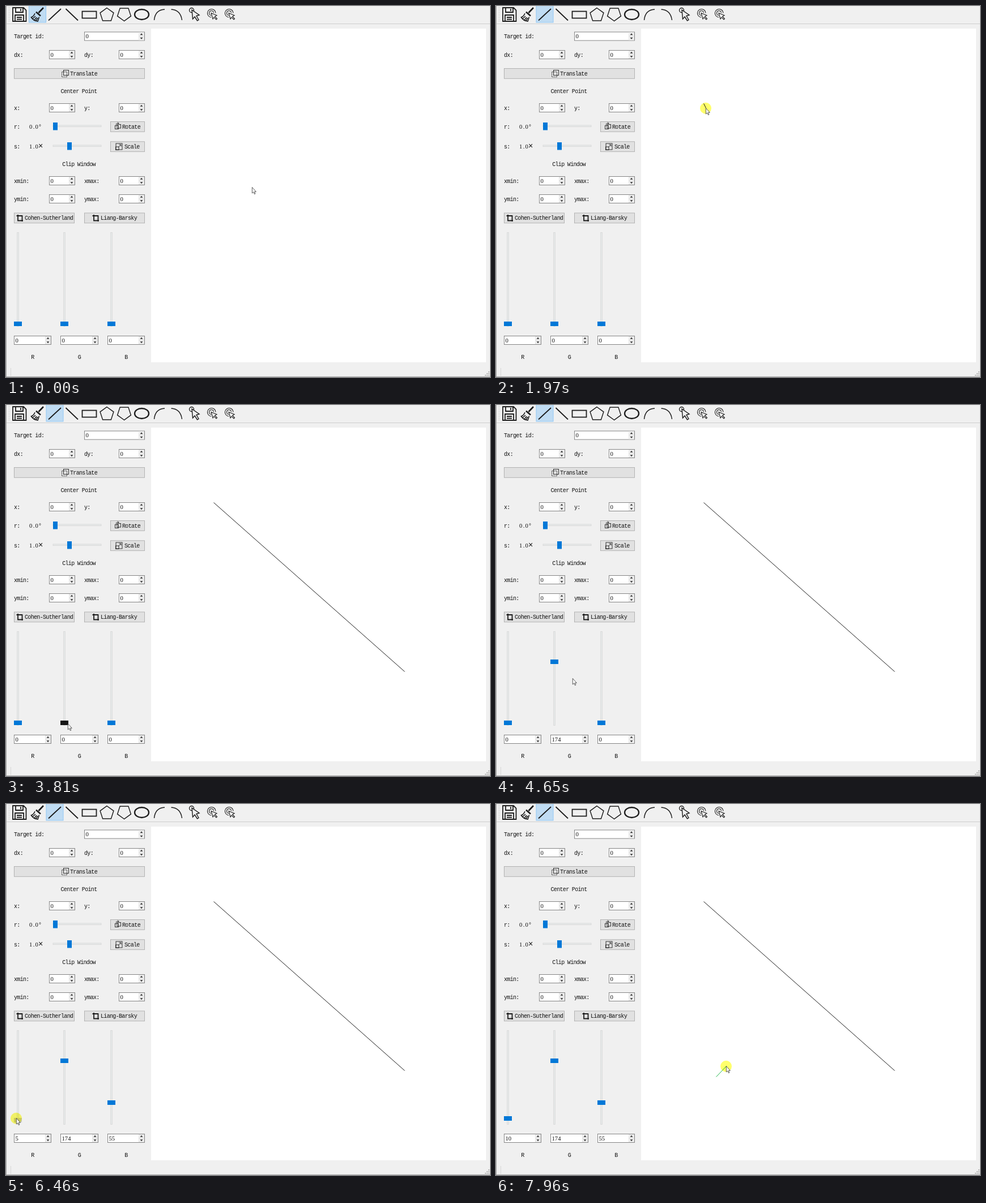
These frames come from a looping animation (854 px wide and 656 px high, 8 s). An HTML page:

```html
<!DOCTYPE html>
<html lang="en">
<head>
<meta charset="utf-8">
<title>Drawing board</title>
<style>
html, body { margin: 0; width: 100%; height: 100%; overflow: hidden; background: #f0f0f0; }
svg { display: block; width: 854px; height: 656px; }
text { font: 10px "Liberation Mono", "DejaVu Sans Mono", monospace; letter-spacing: -.67px; fill: #111; white-space: pre; }
.number { font: 10.67px "Liberation Serif", "Noto Serif", serif; letter-spacing: 0; }
.ink { fill: none; stroke: #1c1c1c; stroke-width: 1.8; }
.thin { fill: none; stroke: #222; stroke-width: .9; }
.field { fill: #fff; stroke: #7a7a7a; stroke-width: .9; }
.spin { fill: #f0f0f0; stroke: #dadada; stroke-width: .6; }
.button { fill: #e1e1e1; stroke: #adadad; stroke-width: .9; }
.groove { fill: #e7eaea; stroke: #d6d6d6; stroke-width: .8; }
</style>
</head>
<body>
<svg viewBox="0 0 854 656">
  <rect width="854" height="656" fill="#f0f0f0"/>
  <path d="M.5 0V656M0 655.5H854" stroke="#a6a6a6"/>
  <path d="M1 31.5H854" stroke="#cfcfcf"/>
  <path d="M5.5 2V29" stroke="#c4c4c4" stroke-width="1.5" stroke-dasharray="1 2"/>
  <path d="M8.5 640V654" stroke="#d7d7d7"/>
  <path d="M851 647h2M848 650h5M845 653h8" stroke="#b4b4b4" stroke-width="2" stroke-dasharray="2 1"/>
  <rect x="256" y="40" width="591" height="590" fill="#fff"/>
  <rect id="checked" y="-.5" width="30" height="29.5" fill="#c0dcf3" stroke="#90c8f6"/>
  <g id="toolbar" class="ink">
    <path d="M12 3H31L35.500 7.500V27H12ZM17 3V11H30V3M26 5V9M16 27V16H31V27M19 20H28M19 23.500H28"/>
    <path d="M66 3L57.500 12" stroke-width="2.600"/>
    <path d="M53 10.500L61 17.500" stroke-width="2.600"/>
    <path d="M51 13Q49 18.500 44.500 20Q48 26 56 27L58.500 19.500M47 22.500L52 18M50 25L54 20M53 26L56 21" stroke-width="1.600"/>
    <path d="M75 25.500L97 5M105.500 5L127 25.500"/>
    <rect x="134.500" y="9.500" width="25" height="12"/>
    <ellipse cx="239.500" cy="15" rx="12.500" ry="9" stroke-width="2.300"/>
    <path d="M261.500 25Q263 7 280 6M291.500 6Q308 7 310.500 25" stroke-width="1.400"/>
    <circle cx="327.500" cy="7.500" r="4" stroke-width="1.300"/>
    <path d="M328 7L329.500 23L333 19L337.500 26L340 24.500L336 17.500L341 16Z" fill="#f0f0f0" stroke-width="1.400"/>
  </g>
  <g id="panel"></g>
  <path id="first" stroke="#000" stroke-width=".9"/>
  <path id="second" stroke="#0aae37" stroke-width=".9"/>
  <circle id="glow" r="10" fill="#ffff6c" style="mix-blend-mode:multiply"/>
  <path id="arrow" d="M.300 .500V11L2.700 8.900L4.400 12.700L5.900 12L4.300 8.400H7.300Z" fill="#fff" stroke="#333" stroke-width=".8"/>
</svg>
<script>
const $ = id => document.getElementById(id);

function add(tag, attrs, parent = $('panel')) {
  const el = document.createElementNS('http://www.w3.org/2000/svg', tag);
  for (const key in attrs) el.setAttribute(key, attrs[key]);
  parent.append(el);
  return el;
}
const rect = (cls, x, y, width, height) => add('rect', { class: cls, x, y, width, height });

// y is the middle of the line of text
function label(s, x, y, attrs = {}) {
  const el = add('text', { x, y: y + 3.2, ...attrs });
  el.textContent = s;
  return el;
}
const centred = (s, x, y) => label(s, x, y, { 'text-anchor': 'middle' });

function spinBox(x, y, w) {
  const right = x + w;
  rect('field', x + .5, y - 7.5, w - 1, 15);
  for (const side of [-1, 1]) {
    rect('spin', right - 10.5, y - 3.25 + side * 3.5, 9, 6.5);
    add('path', { d: `M${right - 8.5} ${y + side * 2.2}h5l-2.5 ${side * 3}z`, fill: '#333' });
  }
  return label('0', x + 2.5, y + .7, { class: 'number' });
}

function button(s, x, y, w, textX) {
  rect('button', x + .5, y, w - 1, 17.8);
  label(s, textX, y + 9);
}

// Square of the given size at the middle of an icon
const square = (x, y, size, dash = '') =>
  add('rect', { class: 'thin', x, y, width: size, height: size, 'stroke-dasharray': dash });

function cropIcon(x, y) {
  add('path', { class: 'ink', 'stroke-width': 1.5, d: `M${x + 2.5} ${y}v10.5h9M${x} ${y + 2}h10v10` });
}

function pentagon(cx, cy, r, turn) {
  const points = [0, 1, 2, 3, 4].map(i => {
    const a = turn + i * Math.PI * .4;
    return [cx + r * Math.sin(a), cy - r * Math.cos(a)];
  });
  add('polygon', { points, style: 'stroke-width:1.5' }, $('toolbar'));
}
pentagon(178, 16, 12.5, 0);
pentagon(208.5, 14, 12.5, Math.PI);

for (const x of [355, 386]) add('path', {
  transform: `translate(${x} 0)`, style: 'stroke-width:1.1',
  d: 'M7 20A7.300 7.300 0 1 1 15 12.500M7 16.500A4 4 0 1 1 11.500 12M7 12.500L10 23L12 20L16 24L17.500 22.500L13.500 18.500L17 16.500Z'
}, $('toolbar'));

label('Target id:', 14, 54);
spinBox(138, 53.5, 107);
for (const [left, right, y] of [['dx:', 'dy:', 86], ['x:', 'y:', 180], ['xmin:', 'xmax:', 309], ['ymin:', 'ymax:', 341]]) {
  label(left, 14, y + .3);
  spinBox(76, y, 46);
  label(right, 138, y + .3);
  spinBox(199, y, 46);
}
centred('Center Point', 128.5, 150.5);
centred('Clip Window', 128.5, 280);

button('Translate', 14, 110.5, 231, 113);
button('Rotate', 184, 204.5, 61, 205);
button('Scale', 184, 239.8, 61, 209);
button('Cohen-Sutherland', 14, 366, 107, 33);
button('Liang-Barsky', 138, 366, 107, 167);
square(101.5, 113.5, 9);
square(98.5, 116.5, 9, '2 1');
square(192.5, 211.5, 6);
square(196, 209.5, 6.5);
add('path', { class: 'thin', d: 'M194 210Q194 207 199 207.500M197 205.500L199 207.500L197 209.500' });
square(193.5, 249, 5.5);
square(194, 243, 11);
add('path', { class: 'thin', d: 'M198 250L203 245M199.500 245H203V248.500' });
cropIcon(18.5, 369);
cropIcon(152.5, 369);

function dial(name, value, unit, y, knobX) {
  label(name, 14, y + .5);
  label(value, 41, y + .5, { class: 'number', style: 'letter-spacing:1.3px' });
  label(unit, 57, y + .5, { style: unit === '×' ? 'font-size:14px' : '' });
  rect('groove', 83, y - 2, 85, 2.6);
  add('rect', { x: knobX, y: y - 7, width: 8, height: 13.5, fill: '#0078d7' });
}
dial('r:', '0.0', '°', 213, 83);
dial('s:', '1.0', '×', 248, 108);

// Each slider follows the pointer while it is dragged
const sliders = [
  { name: 'R', x: 14, w: 66, from: 6330, to: 6620 },
  { name: 'G', x: 96, w: 67, from: 4240, to: 4470 },
  { name: 'B', x: 179, w: 66, from: 5150, to: 5480 }
];
for (const s of sliders) {
  rect('groove', s.x + 5.7, 400.5, 2.6, 166);
  s.knob = add('rect', { x: s.x, width: 14, height: 8 });
  s.text = spinBox(s.x, 591, s.w);
  centred(s.name, s.x + s.w / 2, 621);
}

// Pointer stops: time, x, y, and 1 where the button goes or stays down
const stops = [
  [320, 434, 320], [1120, 85, 14, 1], [1340, 85, 14], [1680, 475, 145],
  [1900, 366, 172, 1], [1970, 370, 180, 1], [2450, 703, 471], [2800, 492, 503],
  [2900, 264, 538], [3310, 119, 565], [4000, 107, 562, 1], [4240, 107, 562, 1],
  [4470, 107, 454], [4650, 135, 483], [5020, 195, 564], [5150, 187, 561, 1],
  [5480, 187, 527], [5720, 187, 527], [6140, 18, 558], [6330, 18, 558, 1],
  [6620, 18, 552], [6750, 18, 552], [7180, 211, 490], [7480, 330, 414],
  [7790, 388, 482, 1], [7960, 406, 463, 1]
];

function pointer(t) {
  const i = stops.findIndex(stop => stop[0] > t);
  const [t1, x1, y1, held] = stops.at(i < 0 ? -1 : Math.max(i - 1, 0));
  if (i <= 0) return { x: x1, y: y1, down: !!held };
  const [t2, x2, y2] = stops[i];
  const p = (t - t1) / (t2 - t1), ease = p * p * (3 - 2 * p);
  return { x: Math.round(x1 + (x2 - x1) * ease), y: Math.round(y1 + (y2 - y1) * ease), down: !!held };
}

const clamp = (v, lo, hi) => Math.min(hi, Math.max(lo, v));

function rubberBand(el, t, from, to) {
  const a = pointer(from), b = pointer(clamp(t, from, to));
  el.setAttribute('d', t < from ? '' : `M${a.x + .5} ${a.y + .5}L${b.x + .5} ${b.y + .5}`);
}

function draw(t) {
  const { x, y, down } = pointer(t);
  $('arrow').setAttribute('transform', `translate(${x} ${y})`);
  $('glow').setAttribute('transform', `translate(${x} ${y + .7})`);
  $('glow').setAttribute('visibility', down ? 'visible' : 'hidden');
  $('checked').setAttribute('x', t < 1340 ? 40.5 : 71);
  rubberBand($('first'), t, 1900, 2450);
  rubberBand($('second'), t, 7790, 8000);

  for (const s of sliders) {
    const rise = pointer(s.from).y - pointer(clamp(t, s.from, s.to)).y;
    const top = 558 - rise;
    const over = x >= s.x && x < s.x + 14 && y >= top - 1 && y < top + 9;
    s.text.textContent = Math.round(rise * 1.612);
    s.knob.setAttribute('y', top);
    s.knob.setAttribute('fill', !over ? '#0078d7' : down ? '#cccccc' : '#171717');
  }
}

const start = performance.now();
function tick() {
  draw((performance.now() - start) % 8000);
  requestAnimationFrame(tick);
}
tick();
</script>
</body>
</html>
```
